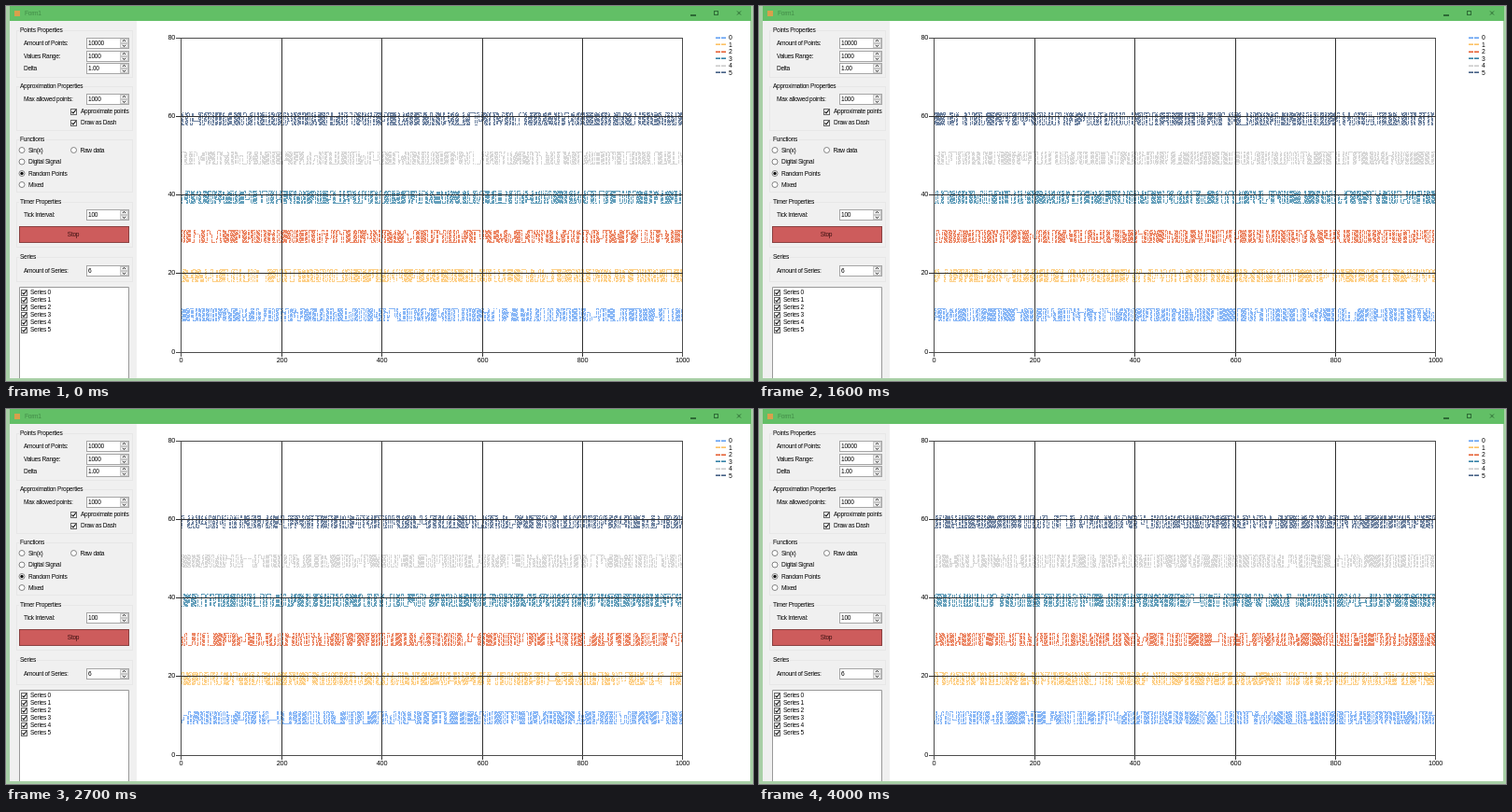
Write an HTML page with a canvas that moves like this. It is 800x402 px and loops after 4100 ms.

```html
<!DOCTYPE html>
<html>
<head>
<meta charset="utf-8">
<title>Form1</title>
<style>
html, body { margin: 0; width: 800px; height: 402px; overflow: hidden; }
canvas { display: block; }
</style>
</head>
<body>
<canvas id="stage" width="800" height="402"></canvas>
<script>
const ctx = document.getElementById('stage').getContext('2d');
const LOOP = 4100, TICK = 100;
const PLOT = { left: 187.3, right: 724.3, top: 34, bottom: 370.6 };
const PALETTE = ['#418cf0', '#fcb441', '#e0400a', '#056492', '#bfbfbf', '#1a3b69'];

function rect(x, y, w, h, color) {
  ctx.fillStyle = color;
  ctx.fillRect(x, y, w, h);
}

function frame(x, y, w, h, color) {
  ctx.strokeStyle = color;
  ctx.lineWidth = 1;
  ctx.strokeRect(x + .5, y + .5, w - 1, h - 1);
}

function setFont(size) {
  ctx.font = `${size}px "Liberation Sans", Arial, sans-serif`;
  ctx.letterSpacing = '-0.28px';
}

function text(str, x, y, size = 6.6, align = 'left', color = '#000') {
  setFont(size);
  ctx.textAlign = align;
  ctx.textBaseline = 'middle';
  ctx.fillStyle = color;
  ctx.fillText(str, x, y + .4);
}

function polyline(points, color, width) {
  ctx.beginPath();
  points.forEach(([x, y]) => ctx.lineTo(x, y));
  ctx.strokeStyle = color;
  ctx.lineWidth = width;
  ctx.stroke();
}

function group(title, top, bottom) {
  frame(11, top, 125, bottom - top, '#e7e7e7');
  setFont(6.6);
  rect(14, top - 1, ctx.measureText(title).width + 2, 3, '#f0f0f0');
  text(title, 15, top);
}

function spinner(label, value, y) {
  text(label, 19, y);
  rect(86, y - 6, 46, 12, '#fff');
  frame(86, y - 6, 46, 12, '#a6a6a6');
  rect(122, y - 5, 9, 10, '#ececec');
  frame(122, y - 5, 9, 5, '#c8c8c8');
  frame(122, y, 9, 5, '#c8c8c8');
  polyline([[125, y - 2], [126.5, y - 3.7], [128, y - 2]], '#333', 1);
  polyline([[125, y + 1.8], [126.5, y + 3.5], [128, y + 1.8]], '#333', 1);
  text(value, 88, y);
}

function checkbox(label, x, y, gap) {
  rect(x, y - 3, 7, 7, '#fff');
  frame(x, y - 3, 7, 7, '#666');
  polyline([[x + 1.5, y + .5], [x + 3, y + 2], [x + 5.7, y - 1.6]], '#111', 1.1);
  text(label, x + gap, y);
}

function radio(label, x, y, checked) {
  ctx.beginPath();
  ctx.arc(x, y, 3, 0, 7);
  ctx.fillStyle = '#fff';
  ctx.fill();
  ctx.strokeStyle = '#666';
  ctx.lineWidth = .8;
  ctx.stroke();
  if (checked) {
    ctx.beginPath();
    ctx.arc(x, y, 1.7, 0, 7);
    ctx.fillStyle = '#111';
    ctx.fill();
  }
  text(label, x + 7, y);
}

function drawWindow() {
  rect(0, 0, 800, 402, '#a8cfa6');
  rect(4, 0, 794, 16, '#62bf66');
  rect(140, 16, 657, 383, '#fff');
  rect(4, 16, 136, 383, '#f0f0f0');
  rect(9, 5, 6, 6, '#d8a04c');
  text('Form1', 20, 8, 6.6, 'left', '#428a48');
  rect(733, 9, 6, 2, '#2d6a35');
  frame(758, 5, 5, 5, '#2d6a35');
  polyline([[783, 5.5], [787, 9.5]], '#2d6a35', 1);
  polyline([[787, 5.5], [783, 9.5]], '#2d6a35', 1);
}

function drawPanel() {
  group('Points Properties', 26, 77);
  spinner('Amount of Points:', '10000', 40);
  spinner('Values Range:', '1000', 54);
  spinner('Delta', '1.00', 67);

  group('Approximation Properties', 86, 134);
  spinner('Max allowed points:', '1000', 100);
  checkbox('Approximate points', 69, 113, 11);
  checkbox('Draw as Dash', 69, 125, 11);

  group('Functions', 143, 200);
  radio('Sin(x)', 17, 154.5);
  radio('Raw data', 72.5, 154.5);
  radio('Digital Signal', 17, 167);
  radio('Random Points', 17, 179.5, true);
  radio('Mixed', 17, 191.5);

  group('Timer Properties', 210, 259);
  spinner('Tick Interval:', '100', 224);
  rect(14, 236, 118, 18, '#cd5c5c');
  frame(14, 236, 118, 18, '#8a4141');
  text('Stop', 72, 245, 6.6, 'center', '#3a1010');

  group('Series', 269, 296);
  spinner('Amount of Series:', '6', 284);
  rect(14, 301, 118, 98, '#fff');
  polyline([[14.5, 399], [14.5, 301.5], [131.5, 301.5], [131.5, 399]], '#999', 1);
  PALETTE.forEach((_, i) => checkbox('Series ' + i, 16, Math.round(306.5 + i * 8.1), 10));
}

function seeded(seed) {
  return () => {
    seed = (seed + 0x6d2b79f5) | 0;
    let t = Math.imul(seed ^ (seed >>> 15), 1 | seed);
    t = (t + Math.imul(t ^ (t >>> 7), 61 | t)) ^ t;
    return ((t ^ (t >>> 14)) >>> 0) / 4294967296;
  };
}

// A dashed zigzag between the edges of the band, one column per pixel.
function drawSeries(index, tick) {
  const random = seeded(tick * 97 + index * 7919 + 11);
  const top = Math.round(324.3 - index * 42.1), height = 13;
  let level = height, dash = 0;
  const dot = (x, y) => { if (dash++ % 5 < 4) ctx.fillRect(x, top + y, 1, 1); };
  ctx.fillStyle = PALETTE[index];
  ctx.globalAlpha = .62;
  for (let x = Math.ceil(PLOT.left); x < PLOT.right - 1; x++) {
    let next = level;
    if (random() < .64) next = level > height / 2 ? 0 : height;
    if (random() < .1) next = random() < .5 ? 4 : 9;
    const step = Math.sign(next - level);
    dash += Math.floor(random() * 5);
    for (dot(x, level); level !== next;) dot(x, level += step);
  }
  ctx.globalAlpha = 1;
}

function drawGrid() {
  const { left, right, top, bottom } = PLOT;
  const shade = (i, last) => i % last ? '#303030' : '#4c4c4c';
  for (let i = 0; i <= 5; i++) {
    const x = Math.round(left + (right - left) * i / 5);
    rect(x, top, 1, Math.round(bottom) - top + 5, shade(i, 5));
    text(i * 200, x + .5, 380, 7.3, 'center');
  }
  for (let i = 0; i <= 4; i++) {
    const y = Math.round(bottom - (bottom - top) * i / 4);
    rect(182, y, 543, 1, shade(i, 4));
    text(i * 20, 181, y, 7.3, 'right');
  }
}

function drawLegend() {
  PALETTE.forEach((color, i) => {
    const y = 34 + i * 7.45;
    for (const x of [760, 766]) rect(x, Math.round(y) - .5, 5, 1.3, color);
    text(i, 774, y, 6.8);
  });
}

let lastTick = -1;
function render() {
  const tick = Math.floor(performance.now() % LOOP / TICK);
  if (tick !== lastTick) {
    lastTick = tick;
    drawWindow();
    drawPanel();
    PALETTE.forEach((_, i) => drawSeries(i, tick));
    drawGrid();
    drawLegend();
  }
  requestAnimationFrame(render);
}
render();
</script>
</body>
</html>
```
